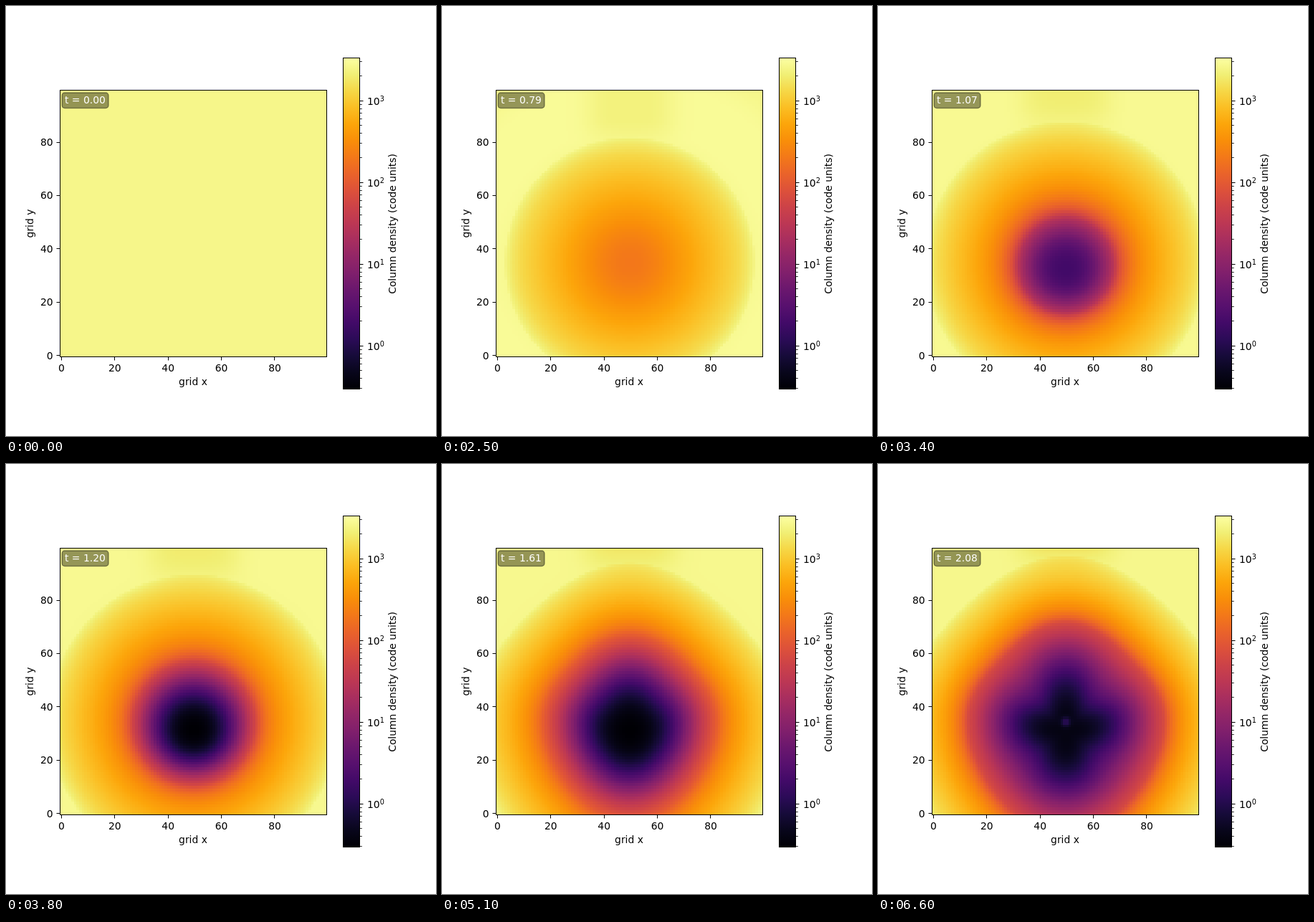
Write an HTML page with a canvas that moves like this. It is 600x600 px and loops after 6700 ms.

```html
<!DOCTYPE html>
<html lang="en">
<head>
<meta charset="utf-8">
<title>Column density</title>
<style>
  html, body { margin: 0; width: 100%; height: 100%; overflow: hidden; background: #fff; }
  canvas { position: absolute; left: 75.5px; top: 117.5px; width: 372px; height: 372px; image-rendering: pixelated; }
  svg { position: absolute; left: 0; top: 0; }
  text { font: 13.89px "DejaVu Sans", sans-serif; white-space: pre; }
  .power { font-size: 9.72px; }
</style>
</head>
<body>
<canvas id="map" width="100" height="100"></canvas>
<svg id="plot" width="600" height="600">
  <defs><linearGradient id="bar" x1="0" y1="1" x2="0" y2="0"></linearGradient></defs>
  <rect x="470.5" y="72.5" width="23" height="462" fill="url(#bar)" stroke="#000"/>
  <rect x="75.5" y="117.5" width="372" height="372" fill="none" stroke="#000"/>
  <rect x="78" y="121" width="65" height="21.5" rx="4" fill="#000" fill-opacity=".4" stroke="#000" stroke-opacity=".4" stroke-width="1.39"/>
  <text id="clock" x="82" y="136" fill="#fff"></text>
  <text x="261" y="529" text-anchor="middle">grid x</text>
  <text transform="translate(37.6 303.5) rotate(-90)" text-anchor="middle">grid y</text>
  <text transform="translate(543.6 304) rotate(-90)" text-anchor="middle">Column density (code units)</text>
</svg>
<script>
const $ = id => document.getElementById(id);
const SIZE = 100, FRAMES = 67, STEP = 100, TIME_PER_FRAME = 0.03155;
const DECADES = 4.05, BASE = .971, CORE_RIM = .74;
const clamp = (v, lo, hi) => Math.max(lo, Math.min(hi, v));
const mix = (a, b, w) => a + (b - a) * w;
const smooth = (from, to, v) => {
  const w = clamp((v - from) / (to - from), 0, 1);
  return w * w * (3 - 2 * w);
};

const stops = ('000004 08061b 160b39 2b0b57 420a68 57106e 6a176e 801f6c 932667 a82e5f bc3754 ' +
  'cc4248 dd513a ea632a f37819 f98e09 fca50a fbbe23 f6d746 f1ef75 fcffa4').split(' ');
const rgb = stops.map(h => [0, 2, 4].map(i => parseInt(h.slice(i, i + 2), 16)));
const palette = Array.from({ length: 1001 }, (_, i) => {
  const p = i / 50, j = Math.min(19, Math.floor(p));
  return rgb[j].map((c, n) => mix(c, rgb[j + 1][n], p - j));
});

// How the blast has grown by a given frame
function blastAt(frame) {
  const radius = .01 + 65 * (1 - Math.exp(-((frame / 18.8) ** .877)));
  return {
    radius,
    coreFloor: clamp((38 - frame) * .05, 0, CORE_RIM),
    coreWidth: Math.max(20, .4 * frame + 4.8),
    shell: .038 * Math.exp(-frame / 25),
    dip: 3.5 * smooth(25, 40, frame),
    stretch: .13 * smooth(36, 50, frame),
    squash: .08 * smooth(35, 55, frame),
    cross: smooth(50, 66, frame),
    plumeY: 35 + 1.25 * radius,
    plumeSize: Math.max(1, .4 * radius - 7),
    plumeWidth: 10 + .13 * radius,
    plumeDepth: smooth(3, 10, frame) * (.028 + .0007 * Math.max(0, frame - 25))
  };
}

// Colour level from 0 to 1 at a grid point
function level(x, y, b) {
  const dx = x - 49.5;
  const dy = y - 35 + b.dip * Math.exp(-(dx * dx + (y - 33) ** 2) / 400);
  const r2 = dx * dx + dy * dy + 1e-6;
  const diagonal = (2 * dx * dy / r2) ** 2;
  let r = Math.sqrt(r2);
  r *= dy < 0 ? 1 - b.stretch * (dy * dy / r2) ** 2 : 1 + b.squash * diagonal;
  r *= 1 + .45 * b.cross * diagonal * Math.exp(-r2 / 350);

  // gas left along the line of sight after a sphere is hollowed out, plus the thin gas inside it
  const chord = 2 * Math.sqrt(Math.max(0, b.radius ** 2 - r * r));
  const outer = Math.max(0, 1 - chord / SIZE);
  const coreLevel = mix(b.coreFloor, CORE_RIM, 1 - Math.exp(-((r / b.coreWidth) ** 2.5)));
  const core = 10 ** ((coreLevel - BASE) * DECADES);

  const u = r / b.radius;
  const shell = b.shell * smooth(.85, 1.1, u) * (1 - smooth(1.45, 1.75, u));
  const plume = b.plumeDepth * Math.exp(-((dx / b.plumeWidth) ** 4) - ((y - b.plumeY) / b.plumeSize) ** 4);
  const glow = b.cross * (.03 * Math.exp(-r2 / 200) + .12 * Math.exp(-(dx * dx + (y - 34.5) ** 2) / 3));
  return BASE + Math.log10(Math.hypot(outer, core)) / DECADES + shell - plume + glow;
}

const ctx = $('map').getContext('2d');
const image = ctx.createImageData(SIZE, SIZE);

function draw(frame) {
  const blast = blastAt(frame);
  for (let row = 0, n = 0; row < SIZE; row++) {
    for (let x = 0; x < SIZE; x++, n += 4) {
      const v = level(x, SIZE - 1 - row, blast);
      image.data.set(palette[clamp(Math.round(v * 1000), 0, 1000)], n);
      image.data[n + 3] = 255;
    }
  }
  ctx.putImageData(image, 0, 0);
  $('clock').textContent = 't = ' + (frame * TIME_PER_FRAME).toFixed(2);
}

// Axes
let marks = '';
const tick = (x, y, w, h, width = 1) =>
  marks += `<path d="M${x} ${y}l${w} ${h}" stroke="#000" stroke-width="${width}"/>`;
const label = (x, y, anchor, text) =>
  marks += `<text x="${x}" y="${y}" text-anchor="${anchor}">${text}</text>`;
const snap = v => Math.floor(v) + .5;

for (let v = 0; v <= 80; v += 20) {
  const x = 77.36 + v * 3.72, y = 487.64 - v * 3.72;
  tick(snap(x), 490, 0, 4.5);
  label(x, 510, 'middle', v);
  tick(75, snap(y), -4.5, 0);
  label(65.7, Math.round(y) + 5, 'end', v);
}
for (let power = -1; power <= 3; power++) {
  for (let m = 1; m <= 9; m++) {
    const log = power + Math.log10(m);
    if (log < -.526 || log > 3.526) continue;
    const y = snap(474.3 - 114 * log);
    tick(494, y, m > 1 ? 2.8 : 4.5, 0, m > 1 ? .8 : 1);
    if (m === 1) label(504, y + 5.5, 'start', `10<tspan class="power" dy="-5.3">${power}</tspan>`);
  }
}
$('plot').insertAdjacentHTML('beforeend', marks);
$('bar').innerHTML = stops.map((c, i) => `<stop offset="${i / 20}" stop-color="#${c}"/>`).join('');

let shown = -1;
function loop() {
  const frame = Math.floor(performance.now() / STEP) % FRAMES;
  if (frame !== shown) draw(shown = frame);
  requestAnimationFrame(loop);
}
loop();
</script>
</body>
</html>
```
